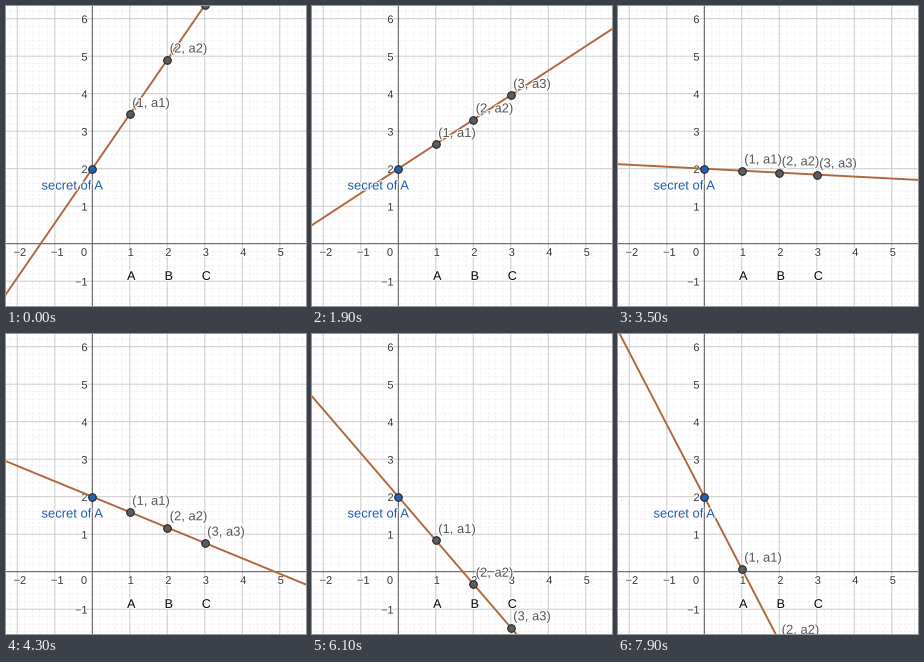
These frames come from a looping animation (300x300 px, 8 s). A matplotlib script:

```python
import numpy as np
import matplotlib.pyplot as plt
from matplotlib.animation import FuncAnimation
from matplotlib.patheffects import withStroke

SIZE, DPI = 300, 100
PX = 72 / DPI                     # points per pixel
OX, OY, UNIT = 86.3, 237.7, 37.5  # origin and unit length in pixels
FRAMES, STEP = 80, 100
SECRET = 2
FONT = "Liberation Sans"
LABEL, NUMBER = 13, 11            # font sizes in pixels
LIFT = 11.8                       # label height above its point

# slope of the line over time
TIMES = [0, 900, 1100, 1800, 2700, 4300, 4500, 5300, 5400, 6100, 6300, 7200, 7900]
SLOPES = [1.453, 1.06, 0.942, 0.697, 0.306, -0.411, -0.504,
          -0.860, -0.903, -1.163, -1.19, -1.61, -1.925]

plt.rcParams["path.simplify"] = False
fig = plt.figure(figsize=(SIZE / DPI, SIZE / DPI), dpi=DPI, facecolor="white")
ax = fig.add_axes([0, 0, 1, 1])
ax.set_xlim(0, SIZE)
ax.set_ylim(SIZE, 0)
ax.axis("off")


def sx(x):
    return OX + UNIT * x


def sy(y):
    return OY - UNIT * y


def baseline(y, size):
    """Baseline that centres digits vertically on y."""
    return y + 0.35 * size


def write(x, y, s, size, color, z, ha="left"):
    return ax.text(x, baseline(y, size), s, fontsize=size * PX, family=FONT,
                   color=color, ha=ha, va="baseline", zorder=z, clip_on=True,
                   path_effects=[withStroke(linewidth=2 * PX, foreground="white")])


def dot(x, y, color, z):
    return ax.plot([x], [y], "o", ms=7.6 * PX, mfc=color, mec="#1c1c1c",
                   mew=1.0 * PX, zorder=z, snap=False)[0]


def rule(k, vertical, **style):
    draw = ax.axvline if vertical else ax.axhline
    draw(sx(k) if vertical else sy(k), snap=False, **style)


def draw_grid():
    minor = dict(color="#eeeeee", lw=0.8 * PX, ls=(0, (3, 2.5)), zorder=1)
    major = dict(color="#cbcbcb", lw=1.0 * PX, zorder=2)
    for i in range(-15, 35):
        for vertical in (True, False):
            if i % 5:
                rule(i / 5, vertical, **minor)
            elif i:
                rule(i // 5, vertical, **major)
    for vertical in (True, False):
        rule(0, vertical, color="#505050", lw=1.0 * PX, zorder=3)


def draw_numbers():
    ink = "#333333"
    write(78, 246, "0", NUMBER, ink, 4, "center")
    for k in range(-2, 7):
        s = str(k).replace("-", "\u2212")
        if k:
            write(sx(k) + (2.5 if k < 0 else 1), 246, s, NUMBER, ink, 4, "center")
            write(81.5, sy(k) + 0.5, s, NUMBER, ink, 4, "right")


draw_grid()
draw_numbers()
for k, name in enumerate("ABC", 1):
    write(sx(k) + 1.5, 269.5, name, 12.5, "black", 5, "center")

line, = ax.plot([], [], color="#b0663c", lw=1.9 * PX, zorder=6)
write(35.5, 179, "secret of A", LABEL, "#1f5ba8", 7)
dot(sx(0), sy(SECRET), "#2463b4", 8)

dots, labels = [], []
for k in (1, 2, 3):
    dots.append(dot(sx(k), 0, "#5c5c5c", 8 + 2 * k))
    labels.append(write(sx(k) + 2.4, 0, f"({k}, a{k})", LABEL, "#555555", 7 + 2 * k))


def update(i):
    m = np.interp(i * STEP, TIMES, SLOPES)
    ends = np.array([-3.0, 6.5])
    line.set_data(sx(ends), sy(SECRET + m * ends))
    for k, (p, label) in enumerate(zip(dots, labels), 1):
        y = sy(SECRET + m * k)
        p.set_data([sx(k)], [y])
        label.set_y(baseline(y - LIFT, LABEL))
    return [line, *dots, *labels]


anim = FuncAnimation(fig, update, frames=FRAMES, interval=STEP, repeat=True, blit=False)
plt.show()
```
